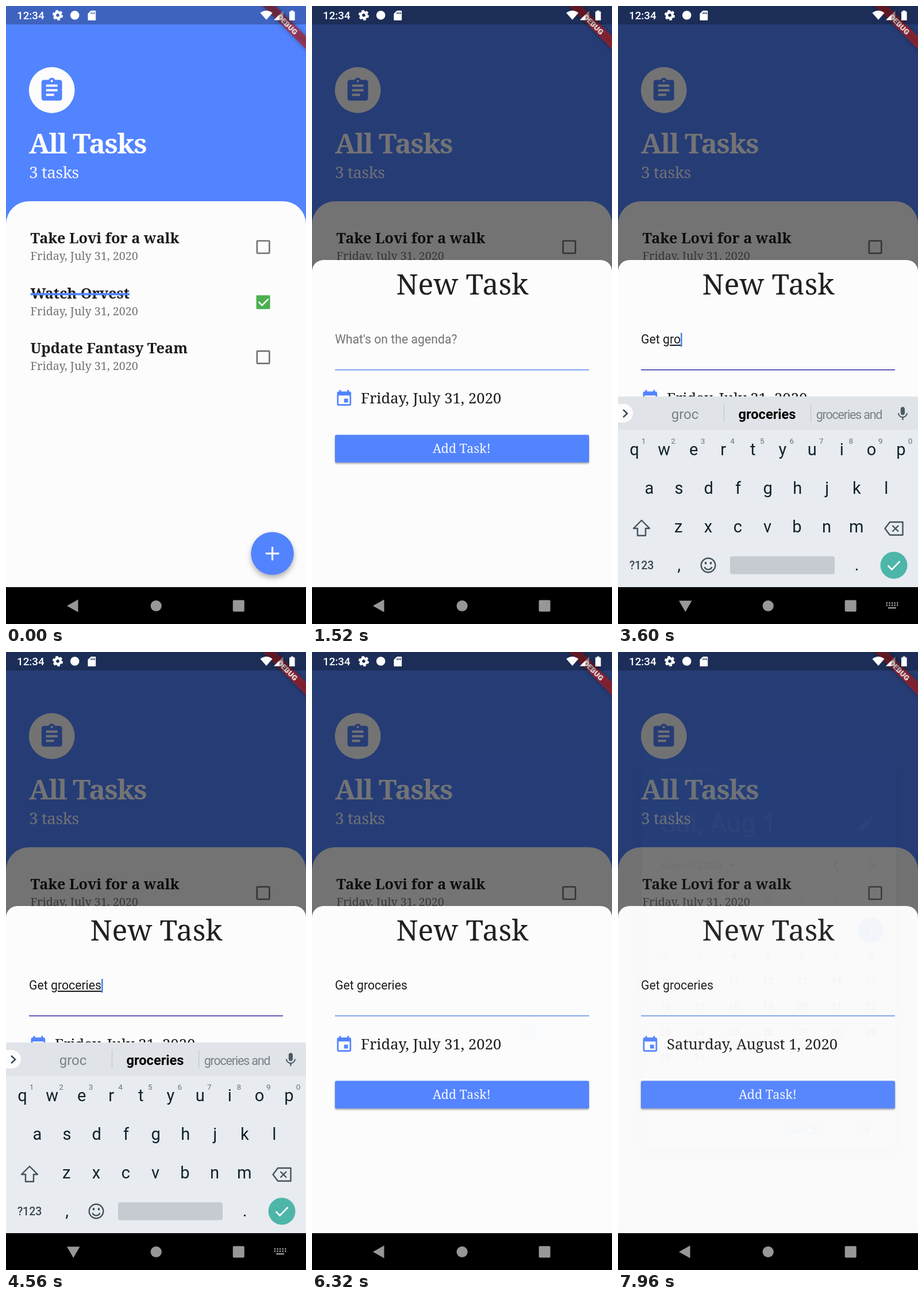
An HTML page for the animation above (8 s loop, 522 px wide and 1073 px high).

```html
<!DOCTYPE html>
<html lang="en">
<head>
<meta charset="utf-8">
<title>All Tasks</title>
<style>
html, body { margin: 0; width: 100%; height: 100%; overflow: hidden; background: #000; }
svg { display: block; width: 100%; height: 100%; }
text { font-family: Roboto, sans-serif; white-space: pre; }
.serif { font-family: "Noto Serif", serif; }
.mid { text-anchor: middle; }
.med { font-weight: 500; }
.bold { font-weight: 700; }
.title { font-size: 25.25px; font-weight: 700; fill: #1c1c1e; }
.date { font-size: 19.7px; fill: #737373; }
.key { font-size: 29px; fill: #10222b; }
.hint { font-size: 13.5px; fill: #68737a; }
.day { font-size: 16px; fill: #212121; }
.tight { letter-spacing: -1.2px; }
.word { text-decoration: underline; }

#scrim, #sheet, #line, #keys, #barrier, #dialog, #months, #picked { animation: 8s infinite both; }
#scrim { animation-name: scrim; animation-timing-function: ease; }
#sheet { animation-name: sheet; animation-timing-function: cubic-bezier(0, 0, .2, 1); }
#line { animation-name: line; }
#keys { animation-name: keys; animation-timing-function: cubic-bezier(0, 0, .2, 1); }
#barrier { animation-name: barrier; }
#dialog { animation-name: dialog; }
#months { animation-name: months; animation-timing-function: ease; }
#picked { animation-name: picked; animation-timing-function: step-end; }

@keyframes scrim {
  0%, 12.5% { opacity: 0; }
  15.625%, 100% { opacity: .54; }
}
@keyframes sheet {
  0%, 12.5% { transform: translateY(568px); }
  15.625%, 100% { transform: none; }
}
@keyframes line {
  0%, 31.75% { fill: #4f86e6; }
  34.25%, 76.25% { fill: #241ca0; }
  77.5%, 100% { fill: #4f86e6; }
}
@keyframes keys {
  0%, 32.25% { transform: translateY(332px); }
  35%, 59.75% { transform: none; }
  61.75%, 100% { transform: translateY(332px); }
}
@keyframes dialog {
  0%, 79% { opacity: 0; animation-timing-function: ease-out; }
  81%, 97.375% { opacity: 1; animation-timing-function: ease-in; }
  99.5625%, 100% { opacity: 0; }
}
@keyframes barrier {
  0%, 79% { opacity: 0; animation-timing-function: ease; }
  81%, 97.375% { opacity: .54; animation-timing-function: cubic-bezier(.75, 0, .75, .9); }
  99.5625%, 100% { opacity: 0; }
}
@keyframes months {
  0%, 85% { transform: none; }
  87.5%, 100% { transform: translateX(-442px); }
}
@keyframes picked {
  0% { opacity: 0; }
  91.25%, 100% { opacity: 1; }
}
</style>
</head>
<body>
<svg viewBox="0 0 522 1073" preserveAspectRatio="none">
  <defs>
    <clipPath id="page"><rect x="41" y="400" width="442" height="330"/></clipPath>
  </defs>

  <!-- Task list -->
  <rect width="522" height="1009" fill="#5384ff"/>
  <circle cx="79.7" cy="146" r="39.9" fill="#fcfcfd"/>
  <path transform="translate(55.8 122.4) scale(1.99)" fill="#5384ff" d="M19 3h-4.18C14.4 1.84 13.3 1 12 1c-1.3 0-2.4.84-2.82 2H5c-1.1 0-2 .9-2 2v14c0 1.1.9 2 2 2h14c1.1 0 2-.9 2-2V5c0-1.1-.9-2-2-2zm-7 0c.55 0 1 .45 1 1s-.45 1-1 1-1-.45-1-1 .45-1 1-1zm2 14H7v-2h7v2zm3-4H7v-2h10v2zm0-4H7V7h10v2z"/>
  <text class="serif bold" x="40" y="256" font-size="48" letter-spacing="-1.6" fill="#fcfcfd">All Tasks</text>
  <text class="serif" x="40" y="299" font-size="28" letter-spacing="-.5" fill="#f4f6ff">3 tasks</text>
  <path d="M0 1009V379a40 40 0 0 1 40-40H482a40 40 0 0 1 40 40V1009z" fill="#fcfcfd"/>
  <g id="tasks"></g>
  <circle cx="463.5" cy="950.5" r="37.3" fill="#5384ff" style="filter: drop-shadow(0 5px 5px rgba(0,0,0,.3))"/>
  <path d="M451.8 950.7h23.4M463.5 939v23.4" stroke="#fcfcfd" stroke-width="3.2"/>
  <rect id="scrim" width="522" height="1009"/>

  <!-- New task sheet -->
  <g id="sheet">
    <path d="M0 1009V461a20 20 0 0 1 20-20H502a20 20 0 0 1 20 20V1009z" fill="#fcfcfd"/>
    <text class="serif mid" x="261.5" y="501" font-size="50" fill="#202022">New Task</text>
    <text id="hint" x="40" y="586" font-size="21.25" fill="#737373">What's on the agenda?</text>
    <text id="entry" x="40" y="586" font-size="21.25" fill="#1c1c1e" xml:space="preserve"><tspan id="before"></tspan><tspan id="word"></tspan></text>
    <rect id="caret" y="567.5" width="2.6" height="24" fill="#4a86ea"/>
    <rect id="line" x="40" y="631" width="442" height="1.4"/>
    <path transform="translate(39.4 665.2) scale(1.37)" fill="#5384ff" d="M17 12h-5v5h5v-5zM16 1v2H8V1H6v2H5c-1.11 0-1.99.9-1.99 2L3 19c0 1.1.89 2 2 2h14c1.1 0 2-.9 2-2V5c0-1.1-.9-2-2-2h-1V1h-2zm3 18H5V8h14v11z"/>
    <text id="due" class="serif" x="85" y="690" font-size="25.7" fill="#1c1c1e"></text>
    <rect x="40" y="744.5" width="442" height="48" rx="2.6" fill="#5384ff" style="filter: drop-shadow(0 2px 1.6px rgba(0,0,0,.35))"/>
    <text class="serif mid" x="260.5" y="776" font-size="21.5" fill="#f6f8ff">Add Task!</text>
  </g>

  <!-- Date picker -->
  <rect id="barrier" width="522" height="1009"/>
  <g id="dialog">
    <rect x="41" y="177" width="442" height="686" rx="5" fill="#fff" style="filter: drop-shadow(0 12px 14px rgba(0,0,0,.35))"/>
    <path d="M41 338V182a5 5 0 0 1 5-5H478a5 5 0 0 1 5 5V338z" fill="#2196f3"/>
    <text x="74" y="210" font-size="13.4" letter-spacing="1.6" fill="#fff">SELECT DATE</text>
    <text id="chosen" x="74" y="313" font-size="45" fill="#fff"></text>
    <path transform="translate(416 281) scale(1.34)" fill="#fff" d="M3 17.25V21h3.75L17.81 9.94l-3.75-3.75L3 17.25zM20.71 7.04c.39-.39.39-1.02 0-1.41l-2.34-2.34c-.39-.39-1.02-.39-1.41 0l-1.83 1.83 3.75 3.75 1.83-1.83z"/>
    <text id="month" class="med" x="74" y="377" font-size="18.8" fill="#666"></text>
    <path id="drop" d="M-6.5-3h13L0 3.6z" fill="#666"/>
    <path d="M383 363l-8 8 8 8M439 363l8 8-8 8" fill="none" stroke="#666" stroke-width="2.6"/>
    <g clip-path="url(#page)">
      <g id="months">
        <g id="july"></g>
        <g id="august" transform="translate(442)"></g>
      </g>
    </g>
    <g class="mid med" font-size="17.5" letter-spacing="1" fill="#2196f3">
      <text x="325" y="837">CANCEL</text>
      <text x="428" y="837">OK</text>
    </g>
  </g>

  <!-- Banner and status bar -->
  <g transform="translate(522 0) rotate(45)">
    <rect x="-90" y="37.2" width="180" height="15.9" fill="#b71c1c" fill-opacity=".63" style="filter: drop-shadow(0 0 4px rgba(0,0,0,.5))"/>
    <text class="mid" y="50" font-size="13.5" font-weight="900" fill="#fff" fill-opacity=".9">DEBUG</text>
  </g>
  <rect width="522" height="32" fill-opacity=".25"/>
  <g fill="#fff">
    <text class="med" x="19" y="23" font-size="18.8">12:34</text>
    <g fill="none" stroke="#fff">
      <circle cx="90" cy="16" r="5" stroke-width="4.4"/>
      <circle cx="90" cy="16" r="7.8" stroke-width="2.6" stroke-dasharray="4.6 3.57"/>
    </g>
    <circle cx="119.7" cy="16" r="7.8"/>
    <path fill-rule="evenodd" d="M148 8h7q1.2 0 1.2 1.2v14.6q0 1.2-1.2 1.2h-11.4q-1.2 0-1.2-1.2V13.3zM147.5 11v3h1.5v-3zM150.3 11v3h1.5v-3zM153 11v3h1.5v-3z"/>
    <path d="M442.5 12Q453 4 463.5 12L453 24z"/>
    <path d="M466 24.5L482.500 8V24.5z" fill-opacity=".35"/>
    <path d="M466 24.5L475.500 15V24.5z"/>
    <path d="M493 9.5h2.6V7.8h4.4v1.7h2.6V25h-9.6z"/>
  </g>

  <!-- Keyboard -->
  <g id="keys">
    <rect y="678" width="522" height="332" fill="#e8ebf0"/>
    <rect y="678" width="522" height="58" fill="#e0e4e8"/>
    <path d="M0 691H10a16 16 0 0 1 0 32H0z" fill="#fcfcfd"/>
    <path d="M9 701l7 6.5-7 6.5" fill="none" stroke="#3d4f58" stroke-width="2.6"/>
    <path d="M184.5 691v32M335.5 691v32" stroke="#c3c9cd" stroke-width="1.3"/>
    <g class="mid" font-size="24">
      <text id="s0" x="116.5" y="717" fill="#788187"></text>
      <text id="s1" class="bold" x="259.5" y="717" font-size="23.6"></text>
      <text id="s2" class="tight" x="402" y="717" font-size="21.5" fill="#788187"></text>
    </g>
    <path transform="translate(481 693.5) scale(1.2)" fill="#4c5b64" d="M12 14c1.66 0 2.99-1.34 2.99-3L15 5c0-1.66-1.34-3-3-3S9 3.34 9 5v6c0 1.66 1.34 3 3 3zm5.3-3c0 3-2.54 5.1-5.3 5.1S6.7 14 6.7 11H5c0 3.41 2.72 6.23 6 6.72V21h2v-3.28c3.28-.48 6-3.3 6-6.72h-1.7z"/>
    <g id="letters"></g>
    <g fill="none" stroke="#43525b" stroke-width="2.4" stroke-linejoin="round">
      <path d="M41 893l14 14h-7v12.5H34V907h-7z"/>
      <path d="M473 896h22.5v22.5H473l-8.5-11.25zM477.5 902l10.5 10.5M488 902l-10.5 10.5"/>
      <circle cx="157" cy="971" r="12.3"/>
      <path d="M150.5 974a7 7 0 0 0 13 0"/>
    </g>
    <path d="M152.5 965.2v4M161.5 965.2v4" stroke="#43525b" stroke-width="3.2"/>
    <text class="mid med" x="41" y="978" font-size="19.5" fill="#3a4a53">?123</text>
    <text class="key mid" x="106" y="980">,</text>
    <text class="key mid" x="415.5" y="980">.</text>
    <rect x="195" y="955.5" width="182" height="31" rx="4" fill="#c6cad1"/>
    <circle cx="480" cy="971" r="23.5" fill="#4db6a9"/>
    <path d="M469.5 971.5l7 7 14-14.5" fill="none" stroke="#fff" stroke-width="2.6"/>
  </g>

  <!-- Navigation bar -->
  <rect y="1009" width="522" height="64"/>
  <g fill="#979797">
    <path id="back" d="M106 1041.5L125.5 1030.5V1052.5z"/>
    <g id="close">
      <path d="M106 1032.5H128.5L117.25 1052z"/>
      <g stroke="#979797" stroke-width="2.5">
        <path d="M466.5 1036.5h21M466.5 1040.5h21" stroke-dasharray="2.6 2"/>
        <path d="M470 1045h14"/>
      </g>
    </g>
    <circle cx="261.2" cy="1041.5" r="9.6"/>
    <rect x="394.7" y="1031.5" width="20" height="20" rx="2"/>
  </g>
</svg>
<script>
const $ = id => document.getElementById(id);
const add = (id, markup) => $(id).insertAdjacentHTML('beforeend', markup);
const label = (cls, x, y, s) => `<text class="${cls}" x="${x}" y="${y}">${s}</text>`;

// Task rows
['Take Lovi for a walk', 'Watch Orvest', 'Update Fantasy Team'].forEach((name, i) => {
  const y = 95.7 * i;
  add('tasks', label('serif title', 42.5, 412 + y, name) +
    label('serif date', 42.5, 441 + y, 'Friday, July 31, 2020'));
  if (i === 1) {
    const width = $('tasks').querySelectorAll('.title')[i].getComputedTextLength();
    add('tasks', `<rect x="42.5" y="${402.7 + y}" width="${width}" height="3.8" fill="#5384ff"/>
      <rect x="435.5" y="${406.5 + y}" width="24" height="24" rx="1.3" fill="#4caf50"/>
      <path d="M439.5 ${418 + y}l6 6 11-11" fill="none" stroke="#fff" stroke-width="2.6"/>`);
  } else {
    add('tasks', `<rect x="436.8" y="${407.7 + y}" width="21.5" height="21.5" rx="1" fill="none" stroke="#737373" stroke-width="2.65"/>`);
  }
});

// Keyboard letters
[['qwertyuiop', 28.5, 780], ['asdfghjkl', 54.5, 847], ['zxcvbnm', 105.3, 914]].forEach(([row, x, y], r) => {
  [...row].forEach((c, i) => {
    const cx = x + 51.55 * i;
    add('letters', label('key mid', cx, y, c) + (r ? '' : label('hint mid', cx + 16, 759.5, (i + 1) % 10)));
  });
});

// Calendar pages
const colX = c => 82.3 + 59.6 * c;
const dot = (x, y, n) => `<circle cx="${x}" cy="${y}" r="22" fill="#2196f3"/>` +
  `<text class="day mid" x="${x}" y="${y + 5.7}" style="fill:#fff">${n}</text>`;
function month(id, first, days) {
  [...'SMTWTFS'].forEach((d, c) => add(id, `<g opacity=".6">${label('day mid', colX(c), 438.7, d)}</g>`));
  for (let n = 1; n <= days; n++) {
    const k = first + n - 1;
    add(id, label('day mid', colX(k % 7), 488.7 + 44.2 * Math.floor(k / 7), n));
  }
}
month('july', 3, 31);
month('august', 6, 31);
add('july', dot(colX(5), 659.8, 31));
add('august', `<g id="picked">${dot(colX(6), 483, 1)}</g>`);

// Typing
const phrase = 'Get groceries', typeAt = 2900, typeStep = 107;
const focusAt = 2540, doneAt = 4780, blurAt = 6100;
const guesses = {
  '': ['I', 'The', "I'm"], G: ['G', 'Get', 'Good'], Ge: ['Ge', 'Get', 'Getting'],
  Get: ['Get', 'Get it', 'Getting'], 'Get ': ['the', 'a', 'it'],
  'Get g': ['g', 'good', 'going'], 'Get gr': ['gr', 'great', 'green']
};
const more = ['groc', 'groceries', 'groceries and'];

const show = (id, on) => { $(id).style.visibility = on ? 'visible' : 'hidden'; };
const put = (id, s) => { if ($(id).textContent !== s) $(id).textContent = s; };

let start;
function render(now) {
  start ??= now;
  const t = (now - start) % 8000;
  const count = Math.max(0, Math.min(phrase.length, Math.floor((t - typeAt) / typeStep) + 1));
  const typed = phrase.slice(0, count);
  const cut = typed.lastIndexOf(' ') + 1;
  put('before', typed.slice(0, cut));
  put('word', typed.slice(cut));
  $('word').setAttribute('class', t < doneAt ? 'word' : '');
  show('hint', !count);
  (guesses[typed] || more).forEach((s, i) => put('s' + i, s));

  const lastEdit = t >= doneAt ? doneAt : count ? typeAt + (count - 1) * typeStep : focusAt;
  const lit = Math.floor((t - lastEdit) / 500) % 2 === 0;
  show('caret', t >= focusAt && t < blurAt && lit);
  $('caret').setAttribute('x', 40 + (count ? $('entry').getComputedTextLength() : 0));

  const ime = t >= 2580 && t < 4900;
  show('back', !ime);
  show('close', ime);

  const turned = t >= 6900;
  put('month', turned ? 'August 2020' : 'July 2020');
  $('drop').setAttribute('transform', `translate(${turned ? 198 : 175} 371)`);
  put('chosen', t >= 7300 ? 'Sat, Aug 1' : 'Fri, Jul 31');
  put('due', t >= 7780 ? 'Saturday, August 1, 2020' : 'Friday, July 31, 2020');
  requestAnimationFrame(render);
}
requestAnimationFrame(render);
</script>
</body>
</html>
```
